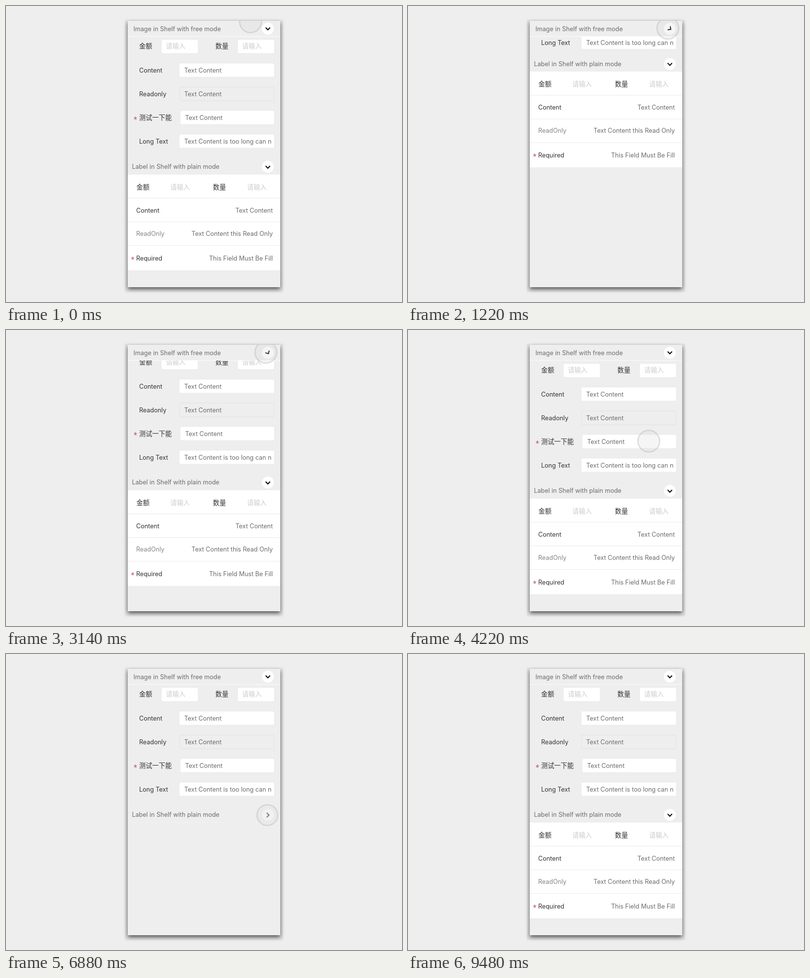
An HTML page that plays this animation: 800 by 600 pixels, repeating every 9.54 s.

```html
<!DOCTYPE html>
<html lang="en">
<head>
<meta charset="utf-8">
<title>Collapsible shelves</title>
<style>
  html, body { margin: 0; width: 100%; height: 100%; overflow: hidden; background: #eee; }
  .phone {
    position: absolute; left: 246px; top: 30px; width: 308px; height: 540px; background: #eee;
    box-shadow: 0 4px 8px rgba(0, 0, 0, .64), 0 4px 2px 6px rgba(0, 0, 0, .05);
  }
  svg { position: absolute; left: 0; top: 0; }
  text { font: 12.5px Inter, "Liberation Sans", sans-serif; fill: #6c6c6c; }
  .cjk { font: 13.2px "Noto Sans CJK SC", "Noto Sans CJK", sans-serif; }
  .label { fill: #333; }
  .hint { fill: #ccc; }
  .dim { fill: #868686; }
  .end { text-anchor: end; }
  .star { font: 17.5px "Liberation Sans", Arial, sans-serif; fill: #c9485f; }
  .box { fill: #fff; stroke: #e6e6e6; stroke-width: .6; }
  .locked { fill: none; stroke: #e1e1e1; stroke-width: 1; }
  .arrow { fill: none; stroke: #000; stroke-width: 2; }
  #ring { stroke: rgba(170, 170, 170, .36); stroke-width: 2.5; }
</style>
</head>
<body>
<div class="phone"></div>
<svg id="stage" width="800" height="600" viewBox="0 0 800 600"></svg>
<script>
const LOOP = 9540, SLIDE = 350;

const text = (x, y, s, cls = '') => `<text x="${x}" y="${y}" class="${cls}">${s}</text>`;
const box = (x, y, w, cls = 'box') =>
  `<rect x="${x}" y="${y}" width="${w}" height="28" rx="3" class="${cls}"/>`;
const clip = (id, x, y, w, h) =>
  `<clipPath id="${id}"><rect x="${x}" y="${y}" width="${w}" height="${h}"/></clipPath>`;
const toggle = (id, y) => `<circle cx="529" cy="${y}" r="12" fill="#fff"/>
  <path id="${id}" class="arrow" d="M-4.5 -2.4L0 2.3L4.5 -2.4"/>`;
const rule = y => `<rect x="246" y="${y}" width="308" height="1" fill="#ebebeb"/>`;

const form =
  text(269, 86, '金额', 'cjk label') + box(314, 68, 74) + text(323, 86, '请输入', 'cjk hint') +
  text(423, 86, '数量', 'cjk label') + box(468, 68, 74) + text(477, 86, '请输入', 'cjk hint') +
  text(269, 135, 'Content', 'label') + box(350, 116, 192) + text(360, 135, 'Text Content') +
  text(269, 183, 'Readonly', 'label') + box(350.5, 164, 191.5, 'locked') + text(360, 183, 'Text Content') +
  text(258, 236.5, '*', 'star') + text(269, 231, '测试一下能', 'cjk label') +
  box(352, 212, 190) + text(362, 231, 'Text Content') +
  text(269, 279, 'Long Text', 'label') + box(350, 260, 192) +
  text(360, 279, 'Text Content is too long can n');

const list =
  '<rect x="246" y="341.5" width="308" height="194" fill="#fff"/>' +
  [389, 437, 485].map(rule).join('') +
  text(263.5, 371.5, '金额', 'cjk label') + text(332, 371.5, '请输入', 'cjk hint') +
  text(418, 371.5, '数量', 'cjk label') + text(487, 371.5, '请输入', 'cjk hint') +
  text(263, 418.5, 'Content', 'label') + text(539, 418.5, 'Text Content', 'end') +
  text(263, 465.5, 'ReadOnly', 'dim') + text(539, 465.5, 'Text Content this Read Only', 'end') +
  text(252.5, 520.5, '*', 'star') + text(263, 515.5, 'Required', 'label') +
  text(539, 515.5, 'This Field Must Be Fill', 'end');

document.getElementById('stage').innerHTML = `
  <defs>
    ${clip('screen', 246, 30, 308, 540)}
    ${clip('formArea', 246, 62, 296.5, 235)}
    ${clip('listArea', 246, 341.5, 308, 200)}
  </defs>
  <g clip-path="url(#screen)">
    <rect x="246" y="61" width="308" height="1.5" fill="#f8f8f8"/>
    ${text(257.5, 51, 'Image in Shelf with free mode')}
    ${toggle('arrowA', 46)}
    <g clip-path="url(#formArea)"><g id="form">${form}</g></g>
    <g id="lower">
      ${text(254.5, 330, 'Label in Shelf with plain mode')}
      ${toggle('arrowB', 326)}
      <g clip-path="url(#listArea)"><g id="list">${list}</g></g>
    </g>
    <circle id="ring"/>
  </g>`;

const $ = id => document.getElementById(id);
const [formEl, lower, listEl, arrowA, arrowB, ring] =
  ['form', 'lower', 'list', 'arrowA', 'arrowB', 'ring'].map($);

const clamp = v => Math.min(1, Math.max(0, v));

// cubic-bezier(.25, .1, .25, 1)
function ease(x) {
  if (x <= 0 || x >= 1) return clamp(x);
  const curve = (s, a, b) => 3 * a * s * (1 - s) ** 2 + 3 * b * s * s * (1 - s) + s ** 3;
  let lo = 0, hi = 1;
  for (let i = 0; i < 24; i++) {
    const mid = (lo + hi) / 2;
    if (curve(mid, .25, .25) < x) lo = mid; else hi = mid;
  }
  return curve(lo, .1, 1);
}

// The slide is eased, the arrow turns at an even rate.
function shelf(t, close, open) {
  const shut = clamp((t - close) / SLIDE), back = clamp((t - open) / SLIDE);
  return { fold: ease(shut) - ease(back), turn: -90 * (shut - back) };
}

// Pointer path: time, x, y
const PATH = [
  [0, 494, 32], [20, 494, 32], [420, 524, 44], [660, 524, 44], [700, 525, 45],
  [3860, 525, 45], [4220, 486.5, 225], [4540, 492, 298], [4800, 511, 321],
  [5260, 528, 326.5], [8290, 528, 326.5], [8390, 590, 329], [LOOP, 590, 329]
];
const PRESSES = [[840, 1000], [2740, 2900], [5460, 5640], [6880, 7100]];

// Monotone cubic through the path points
function slope(i, k) {
  if (i < 1 || i > PATH.length - 2) return 0;
  const d = j => (PATH[j + 1][k] - PATH[j][k]) / (PATH[j + 1][0] - PATH[j][0]);
  const a = d(i - 1), b = d(i);
  return a * b > 0 ? 2 * a * b / (a + b) : 0;
}
function along(t, k) {
  let i = 0;
  while (i < PATH.length - 2 && t >= PATH[i + 1][0]) i++;
  const p = PATH[i], q = PATH[i + 1], h = q[0] - p[0], u = (t - p[0]) / h;
  const w = u * u * (3 - 2 * u);
  return p[k] + (q[k] - p[k]) * w +
    h * u * (1 - u) * ((1 - u) * slope(i, k) - u * slope(i + 1, k));
}

const shift = (el, y) => el.setAttribute('transform', `translate(0 ${y})`);
const spin = (el, y, a) => el.setAttribute('transform', `translate(529 ${y}) rotate(${a})`);

function render(t) {
  const top = shelf(t, 1010, 2905), bottom = shelf(t, 5655, 7105);
  shift(formEl, -226 * top.fold);
  shift(lower, -235 * top.fold);
  shift(listEl, -194 * bottom.fold);
  spin(arrowA, 46, top.turn);
  spin(arrowB, 326.5, bottom.turn);

  const down = PRESSES.some(([a, b]) => t >= a && t < b);
  ring.setAttribute('cx', along(t, 1));
  ring.setAttribute('cy', along(t, 2));
  ring.setAttribute('r', down ? 21 : 22);
  ring.setAttribute('fill', down ? 'rgba(230,230,230,.52)' : 'rgba(210,210,210,.22)');
}

const start = performance.now();
function tick() {
  render((performance.now() - start) % LOOP);
  requestAnimationFrame(tick);
}
tick();
</script>
</body>
</html>
```
